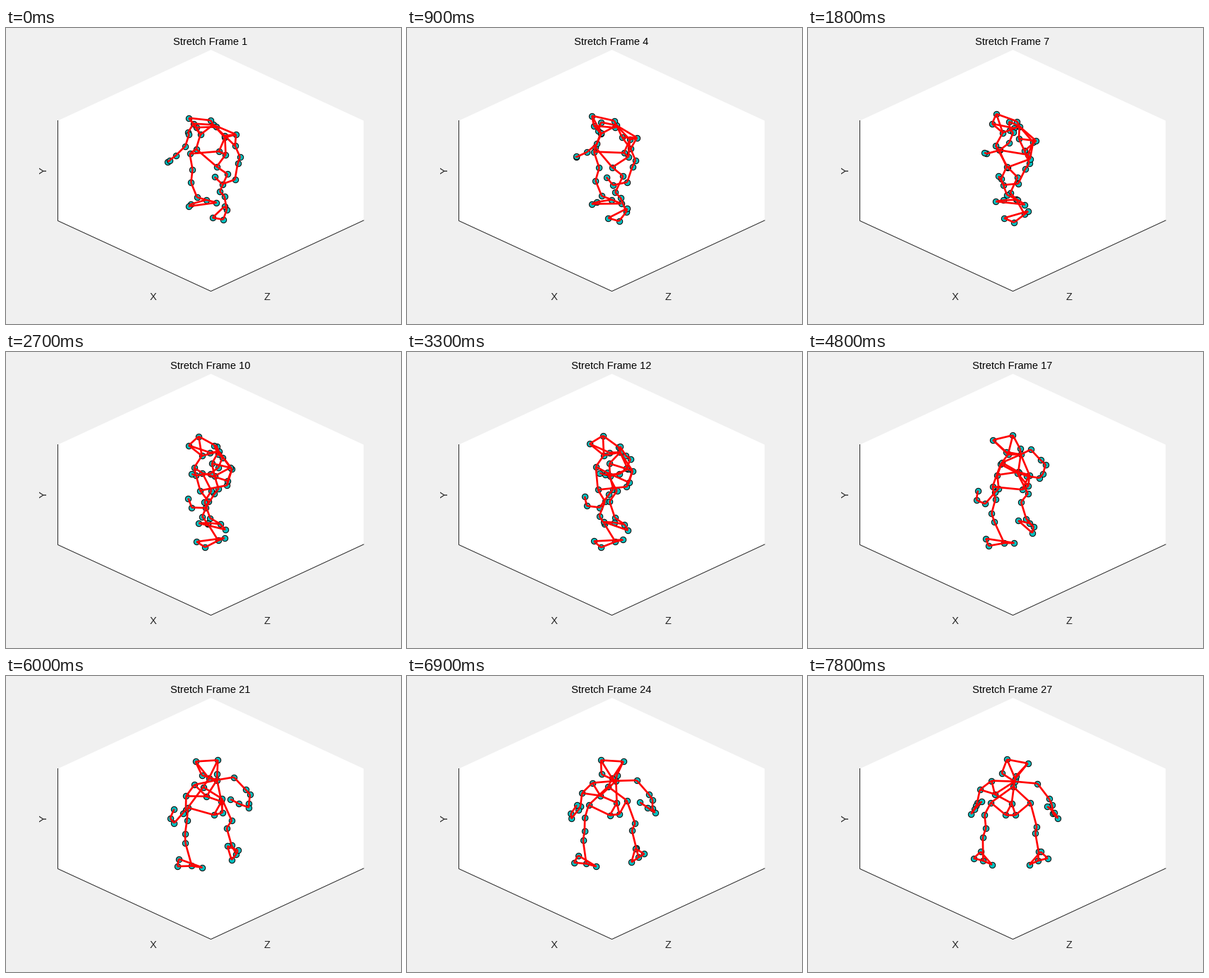
Recreate the animation shown at these times as a matplotlib script. Size 560 by 420 pixels, loop 8000 ms.

```python
import matplotlib.pyplot as plt
import numpy as np
from matplotlib.animation import FuncAnimation
from matplotlib.collections import LineCollection

W, H, DPI = 560, 420, 100
PX = 72 / DPI
POSES, TICKS, TICKS_PER_POSE, TICK_MS = 27, 80, 3, 100

CENTER_X, FLOOR_Y = 287.3, 259.4
TILT = 0.446        # how much depth shows as screen height
TURN = 133          # degrees the body turns over the loop
HEAD_YAW = -23
HEAD_AT = (3.5, 7.5, 125.5)
LEAN = (5.5, 0, 0)  # arms and shoulders sit to one side of the hips
STEP_IN = 19        # how far each foot starts inside its final stance

# Key points of a body at rest: (sideways, forward, up).
# Paired points are mirrored; a fourth value is how much lower the right one is.
HEAD = {"FHD": (16, 15.5, 3), "BHD": (11, -15.5, -3)}
SPINE = {
    "C7": (5.5, -14, 116), "CLAV": (6.5, 10, 109), "STRN": (3.5, 21, 93),
    "T10": (1.5, -33, 93.5), "BACK": (-22.5, -32, 106),
}
ARM = {
    "SHO": (32.5, -6, 111.5, 4), "UPA": (49, -10.7, 96.5, 13),
    "ELB": (53, -16.5, 85.5, 3), "FRM": (54.5, -10.7, 74.5, 11),
    "WRA": (61.5, 1.3, 60, 6), "WRB": (56.5, 21.3, 58.5, 5),
    "FIN": (46.5, 26.7, 66, 7),
}
WAIST = {"FWT": (28, 10.5, 75), "BWT": (7, -26.5, 74)}
LEG = {
    "THI": (37, -2, 55, 17), "KNE": (35, 7.5, 36.5, 7), "SHN": (39.5, -0.5, 21, 20),
    "ANK": (39, -15, 4), "HEE": (26.5, -23, 2),
    "MT5": (52.5, 3, -0.5), "TOE": (42.5, 15.5, 3),
}

# Chains of connected points; {s} stands for either side.
SIDE_CHAINS = [
    "{s}BHD {s}FHD CLAV", "{s}BHD C7 {s}SHO",
    "{s}SHO {s}UPA {s}ELB {s}FRM {s}WRA {s}WRB {s}FIN",
    "STRN {s}FWT {s}BWT T10",
    "{s}FWT {s}THI {s}KNE {s}SHN {s}ANK {s}HEE {s}TOE {s}MT5 {s}ANK",
]
CENTER_CHAINS = [
    "LFHD RFHD", "C7 CLAV STRN", "C7 T10 BACK C7",
    "LSHO BACK LUPA", "LBWT RBWT",
]


def rotate(points, degrees):
    """Turn points about the vertical axis."""
    side, front, up = np.asarray(points, float).T
    c, s = np.cos(np.radians(degrees)), np.sin(np.radians(degrees))
    return np.column_stack([side * c - front * s, side * s + front * c, up])


def mirror(part, offset=(0, 0, 0), yaw=0):
    """Left and right copies of a part as a name-to-point dict."""
    points = {}
    for name, (side, front, up, *drop) in part.items():
        half_drop = sum(drop) / 2
        for prefix, sign in (("L", -1), ("R", 1)):
            points[prefix + name] = (sign * side, front, up - sign * half_drop)
    placed = rotate(list(points.values()), yaw) + offset
    return dict(zip(points, placed))


body = (SPINE | mirror(HEAD, HEAD_AT, HEAD_YAW) | mirror(ARM, LEAN)
        | mirror(WAIST) | mirror(LEG))
index = {name: i for i, name in enumerate(body)}
REST = np.array(list(body.values()), float)
# The step moves the feet fully and fades out up the leg.
STEP_WEIGHT = np.clip(1 - REST[:, 2] / 50, 0, 1) * np.sign(REST[:, 0])


def bone_pairs():
    chains = [c.format(s=side) for c in SIDE_CHAINS for side in "LR"]
    for chain in chains + CENTER_CHAINS:
        ids = [index[name] for name in chain.split()]
        yield from zip(ids, ids[1:])


BONES = np.array(list(bone_pairs()))


def pose(n):
    """Screen positions of all points at pose n."""
    u = (n - 1) / (POSES - 1)
    points = REST.copy()
    points[:, 0] -= STEP_IN * (1 - u * u * (3 - 2 * u)) * STEP_WEIGHT
    x, depth, up = rotate(points, TURN * (1 - u)).T
    return np.column_stack([CENTER_X + x, FLOOR_Y - up - TILT * depth])


plt.rcParams["font.family"] = "Liberation Sans"
fig = plt.figure(figsize=(W / DPI, H / DPI), dpi=DPI, facecolor="#f0f0f0")
ax = fig.add_axes([0, 0, 1, 1])
ax.set(xlim=(0, W), ylim=(H, 0))
ax.axis("off")

box = [(73.5, 131.5), (73.5, 273.5), (290.5, 373.5),
       (507, 273), (507, 131.5), (290.5, 31)]
ax.add_patch(plt.Polygon(box, facecolor="white", edgecolor="none"))
ax.plot(*zip(*box[:4]), color="#262626", lw=1 * PX)


def label(x, y, text, color="#262626", **kw):
    return ax.text(x, y, text, ha="center", va="baseline",
                   fontsize=14.67 * PX, color=color, **kw)


label(209, 386, "X")
label(370.5, 386, "Z")
label(58, 202, "Y", rotation=90, rotation_mode="anchor")
title = label(290, 24, "", color="black")

dots, = ax.plot([], [], "o", ms=8.4 * PX, mfc="#00bfbf", mec="black",
                mew=1 * PX, zorder=3)
bones = LineCollection([], colors="red", linewidths=2.67 * PX, zorder=4)
ax.add_collection(bones)


def update(tick):
    n = min(tick // TICKS_PER_POSE + 1, POSES)
    points = pose(n)
    bones.set_segments(points[BONES])
    dots.set_data(points[:, 0], points[:, 1])
    title.set_text(f"Stretch Frame {n}")
    return dots, bones, title


anim = FuncAnimation(fig, update, frames=TICKS, interval=TICK_MS,
                     repeat=True, repeat_delay=0)
plt.show()
```
